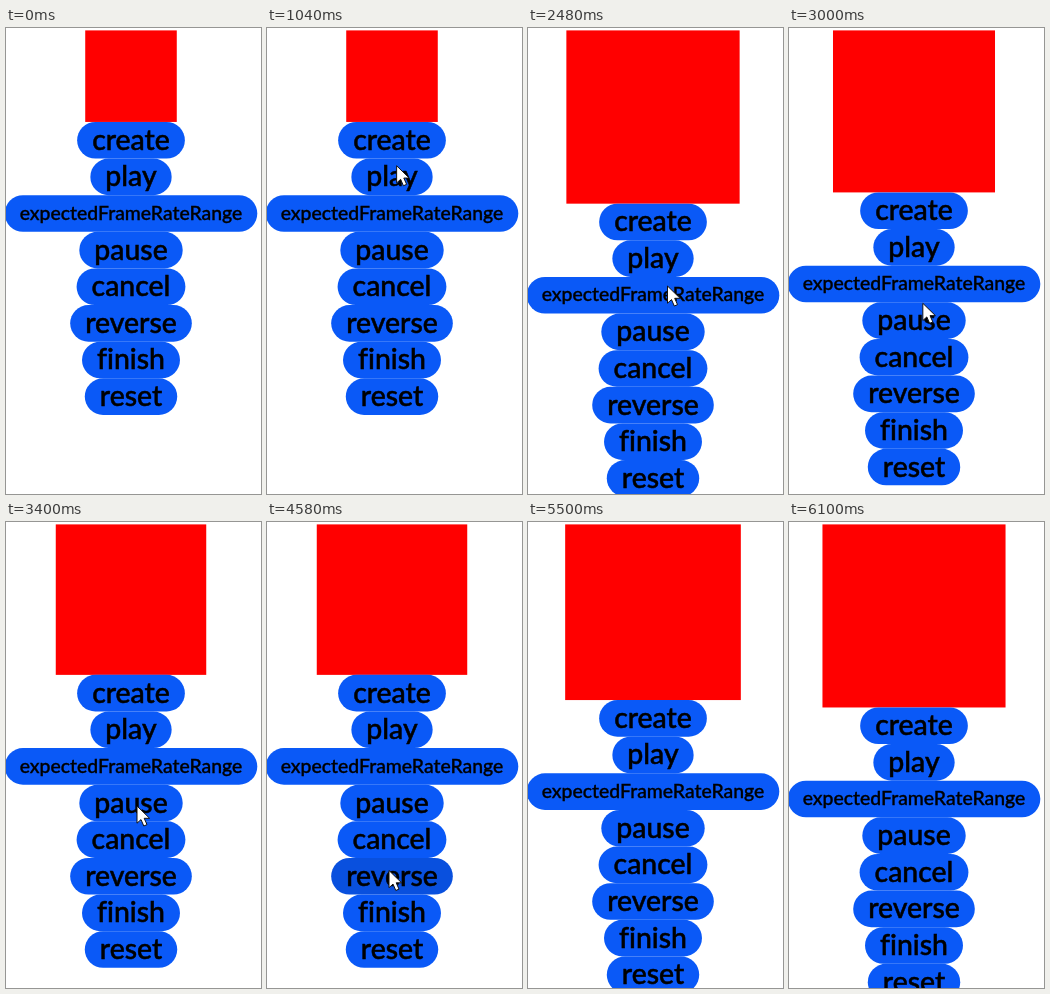
An HTML page for the animation above (7680 ms loop, 255 by 466 pixels).

```html
<!DOCTYPE html>
<html lang="en">
<head>
<meta charset="utf-8">
<title>Animator controls</title>
<style>
  html, body { margin: 0; width: 100%; height: 100%; overflow: hidden; background: #fff; }
  svg { display: block; width: 255px; height: 466px; }
  text {
    font: 500 28.4px Lato, "Open Sans", sans-serif;
    font-variant-ligatures: none;
    text-anchor: middle;
    stroke: #000;
    stroke-width: .5px;
  }
  text.small { font-size: 19.4px; stroke-width: .35px; }
</style>
</head>
<body>
<svg viewBox="0 0 255 466">
  <rect id="box" y="2.4" fill="#f00"/>
  <g id="column"></g>
  <path id="cursor" d="M0 0V17.2L4 13.6L6.8 20L10 18.6L7.2 12.3H12.6Z" fill="#fff" stroke="#111"/>
</svg>
<script>
const LOOP = 7680, STEP = 40;
const CENTER = 125, TOP = 2.4, ROW = 36.62, PADDING = 15;
const SMALL = 91.55, LARGE = 2 * SMALL;
const PLAY = 1360, PAUSE = 3400, REVERSE = 4640, END = 6120;
const BLUE = '#0a59f7', PRESSED = '#0950de';

const labels = 'create play expectedFrameRateRange pause cancel reverse finish reset'.split(' ');

// Where the pointer rests, and which button it holds down there
const stops = [
  { x: 71, y: 206, arrive: 200 },
  { x: 128.5, y: 122, arrive: 640, leave: 920, label: 'create', press: 800, release: 920 },
  { x: 130, y: 143, arrive: 1080, leave: PLAY, label: 'play', press: 1080, release: PLAY },
  { x: 145.5, y: 196, arrive: 1720 },
  { x: 139.5, y: 258, arrive: 2480, leave: 2680, label: labels[2], press: 2560, release: 2680 },
  { x: 131, y: 284, arrive: 3160, leave: 3980, label: 'pause', press: 3280, release: PAUSE },
  { x: 122, y: 348.5, arrive: 4300, leave: 4760, label: 'reverse', press: 4500, release: 4660 },
  { x: 130.5, y: 389, arrive: 5140 },
  { x: 160, y: 470, arrive: 5500 }
];

const box = document.getElementById('box');
const column = document.getElementById('column');
const cursor = document.getElementById('cursor');

function set(node, attrs) {
  for (const key in attrs) node.setAttribute(key, attrs[key]);
  return node;
}

function add(tag, attrs) {
  const node = document.createElementNS('http://www.w3.org/2000/svg', tag);
  return column.appendChild(set(node, attrs));
}

const pills = labels.map((label, i) => {
  const y = TOP + SMALL + i * ROW;
  const small = label.length > 10;
  const pill = add('rect', { y, height: ROW, rx: ROW / 2 });
  const text = add('text', {
    x: CENTER, y: y + ROW / 2 + (small ? 6.2 : 9.5), class: small ? 'small' : ''
  });
  text.textContent = label;
  const width = text.getComputedTextLength() + 2 * PADDING;
  return set(pill, { x: CENTER - width / 2, width });
});

const shrink = t => (0.0028 * (t - PLAY)) ** 2;

function sizeAt(t) {
  if (t < PLAY) return SMALL;
  if (t < REVERSE) return LARGE - shrink(Math.min(t, PAUSE));
  const left = Math.max(0, (END - t) / (END - REVERSE));
  return LARGE - shrink(PAUSE) * left ** 1.7;
}

function pointerAt(t) {
  const next = stops.findIndex(stop => stop.arrive > t);
  if (next < 1) return null;
  const from = stops[next - 1], to = stops[next];
  const leave = from.leave ?? from.arrive;
  const k = Math.max(0, (t - leave) / (to.arrive - leave));
  return [from.x + (to.x - from.x) * k, from.y + (to.y - from.y) * k];
}

function draw(time) {
  // The stepping slips by half a step during the pause
  const shift = time < PAUSE + STEP ? 0 : STEP / 2;
  const t = Math.floor((time - shift) / STEP) * STEP + shift;

  const size = sizeAt(t);
  set(box, { x: CENTER - size / 2, width: size, height: size });
  set(column, { transform: `translate(0 ${size - SMALL})` });

  const held = stops.find(stop => t >= stop.press && t < stop.release);
  pills.forEach((pill, i) =>
    set(pill, { fill: held?.label === labels[i] ? PRESSED : BLUE }));

  const tip = pointerAt(t);
  set(cursor, {
    visibility: tip ? 'visible' : 'hidden',
    transform: `translate(${tip ?? 0})`
  });
}

const start = performance.now();
function tick() {
  draw((performance.now() - start) % LOOP);
  requestAnimationFrame(tick);
}
tick();
</script>
</body>
</html>
```
